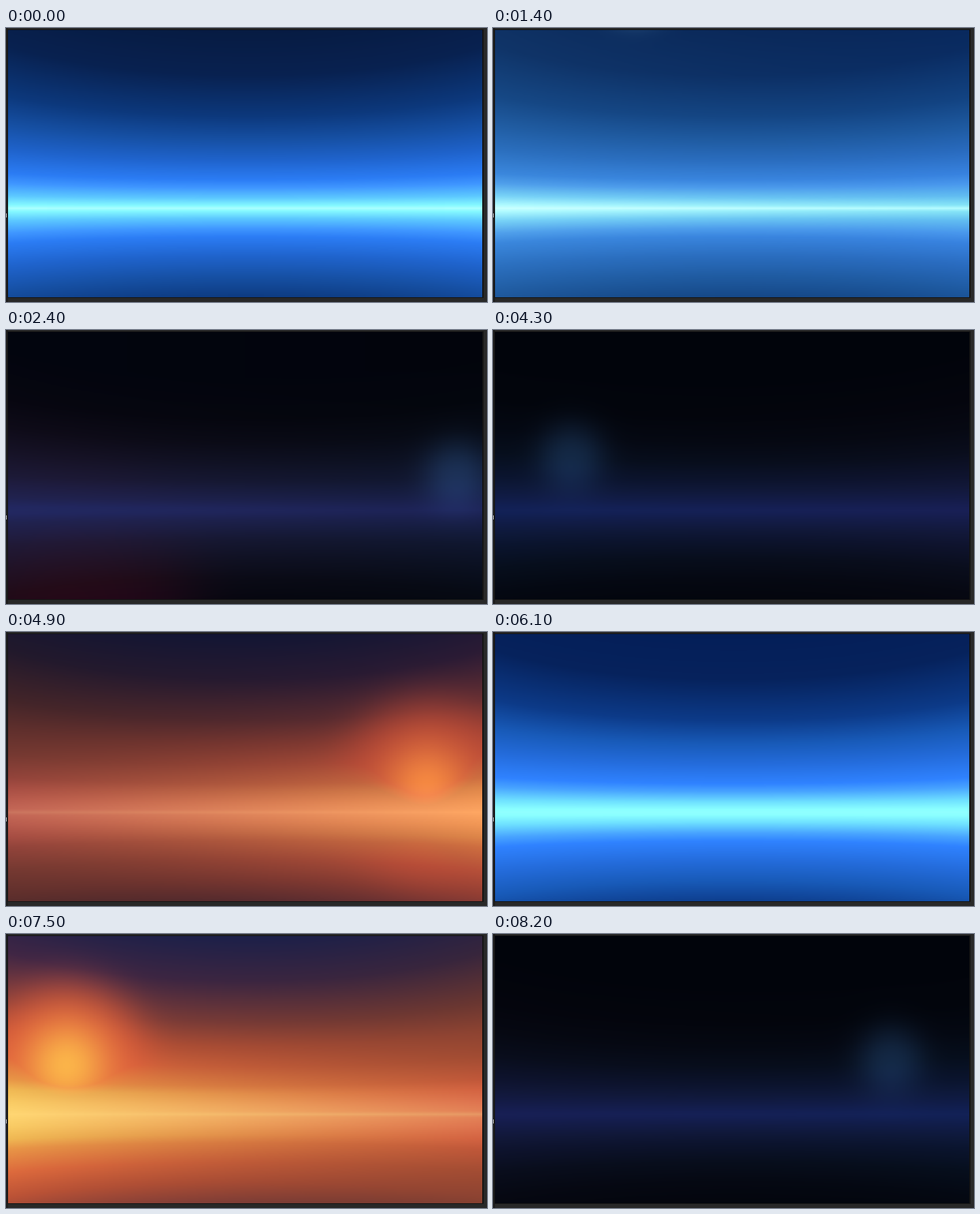
These frames come from a looping animation (707 px wide and 402 px high, 8.3 s). An HTML page with a canvas:

```html
<!DOCTYPE html>
<html lang="en">
<head>
<meta charset="utf-8">
<title>Day and night sky</title>
<style>
html, body { margin: 0; width: 100%; height: 100%; overflow: hidden; background: #282828; }
canvas { display: block; }
</style>
</head>
<body>
<canvas id="stage" width="707" height="402"></canvas>
<script>
const LOOP = 8300, STEP = 100, HOLD_END = 1300;
const DAY = 5532, FIRST_NOON = 707;
const VIEW = { x: 3, y: 3, w: 697, h: 392 };
const CENTER = 353, HORIZON = 264.5, FINE = 4;

const rgb = hex => [0, 2, 4].map(i => parseInt(hex.substr(i, 2), 16));
const palette = text => text.split(' ').map(rgb);
const lerp = (a, b, k) => a + (b - a) * k;
const mix = (a, b, k) => a.map((v, i) => lerp(v, b[i], k));
const clamp = (v, lo, hi) => Math.min(hi, Math.max(lo, v));

// Distance from the horizon of each palette colour.
const STOPS = [0, 4, 15, 30, 42, 70, 100, 135, 195, 262];

// One sky per time away from noon; "near" is the side where the sun stands.
const sky = (at, near, far, sun, core, rim) => ({
  at, near: palette(near), far: palette(far || near), sun, core: rgb(core), rim: rgb(rim)
});
const NIGHT = '12204e 111f4c 0f1b42 0d1734 0a142c 060e1c 040812 02050c 01040b 01040b';
// Sun values: offset from the centre, height on stage, radius.
const SKIES = [
  sky(139, '90ffff 8affff 6ee0ff 48a4ff 2f82ff 246cdc 185ab8 0c3a88 06225c 041e58', '',
    [30, -359, 75], 'b0dee0', '5a94b8'),
  sky(593, 'aaffff 84f8ff 5cc8ff 3f96ff 2b7cf4 1f63cc 1650a4 0c387c 082150 071b42', '',
    [123, -136, 75], 'b0dee0', '5a94b8'),
  sky(861, 'ffffff f8ffff a8e4e8 6cb0c8 5499b4 4084a8 3272a0 266294 1c5490 184c8c',
    'c0f4ff 84c0e8 68a8d8 5898cc 4c8cbc 3a78a8 2a6898 1c548a 0c3c7e 083478',
    [178, -5, 75], 'b0dee0', '5a94b8'),
  sky(1193, 'ffff80 ffff7c fff870 ffe45c ffb84c ff8040 e06438 a04c40 502f52 24295c',
    'ffb468 ff9858 ff8850 fa7440 e86838 c85c34 b45436 8c4638 4a304a 24285a',
    [263, 160, 115], 'ffd850', 'ff6c40'),
  sky(1430, 'ff7050 f8684c e85a44 c84a3c b04038 883234 602630 381a2a 140e22 080a1c',
    'a84c58 9c4654 8c3f4c 703444 5c2c3c 40222f 2a1826 140f1e 080a18 06081a',
    [268, 275, 135], 'f05838', '903030'),
  sky(1693, '222860 222760 20224f 1e1d42 1b1936 151226 0e0b18 070610 02050e 02050e',
    '1c2254 1b2151 171e46 121a38 0f162e 0a1020 060a14 03060d 02040c 02040c',
    [263, 410, 190], '240818', '200818'),
  sky(1950, '181f54 171e52 141b46 111737 0e132e 090d1c 060812 04050d 01040b 01040b',
    '122156 112054 101c47 0d1838 0a142e 060e1c 040812 02050c 01040b 01040b',
    [250, 535, 190], '02040b', '01040b'),
  sky(2250, NIGHT, '', [240, 680, 190], '01040b', '01040b')
];

function skyAt(time) {
  const next = SKIES.findIndex(s => s.at > time);
  if (next === 0) return SKIES[0];
  if (next < 0) return SKIES[SKIES.length - 1];
  const a = SKIES[next - 1], b = SKIES[next];
  const k = (time - a.at) / (b.at - a.at);
  const blend = (p, q) => p.map((c, i) => mix(c, q[i], k));
  return {
    near: blend(a.near, b.near), far: blend(a.far, b.far),
    sun: mix(a.sun, b.sun, k), core: mix(a.core, b.core, k), rim: mix(a.rim, b.rim, k)
  };
}

// Finely sampled colours by distance from the horizon.
function ramp(colors) {
  const out = [];
  for (let i = 0, s = 0; i <= 264 * FINE; i++) {
    const d = i / FINE;
    while (s < STOPS.length - 2 && d > STOPS[s + 1]) s++;
    const k = clamp((d - STOPS[s]) / (STOPS[s + 1] - STOPS[s]), 0, 1);
    out.push(mix(colors[s], colors[s + 1], k));
  }
  return out;
}

function moonAt(phase) {
  const fromMidnight = phase > 0 ? phase - DAY / 2 : phase + DAY / 2;
  const dx = -0.288 * fromMidnight;
  return {
    x: CENTER + dx, y: 147 + 0.00066 * dx * dx,
    light: clamp((1400 - Math.abs(fromMidnight)) / 300, 0, 1)
  };
}
const MOONLIGHT = [13, 27, 42];

const ctx = document.getElementById('stage').getContext('2d');
const buffer = document.createElement('canvas');
buffer.width = 349;
buffer.height = VIEW.h;
const bufferCtx = buffer.getContext('2d');
const image = bufferCtx.createImageData(buffer.width, buffer.height);

function paintSky(phase) {
  const { near, far, sun, core, rim } = skyAt(Math.abs(phase));
  const side = phase > 0 ? -1 : 1;
  const nearRamp = ramp(near), farRamp = ramp(far);
  const sunX = CENTER + side * sun[0], sunY = sun[1], sunR = sun[2];
  const moon = moonAt(phase);
  const scale = VIEW.w / buffer.width;
  let o = 0;
  for (let row = 0; row < buffer.height; row++) {
    const y = VIEW.y + row + 0.5;
    for (let col = 0; col < buffer.width; col++, o += 4) {
      const x = VIEW.x + (col + 0.5) * scale;
      const u = (x - CENTER) / 350;
      const d = Math.abs(y - HORIZON) * (1 - 0.18 * u * u);
      const index = Math.round(d * FINE);
      const a = farRamp[index], b = nearRamp[index];
      const nearness = clamp(0.5 + 0.5 * u * side, 0, 1);
      const s = Math.hypot(x - sunX, y - sunY) / sunR;
      const glow = s < 2 ? Math.exp(-(s ** 4)) : 0;
      const heat = glow ? Math.exp(-3.4 * s * s) : 0;
      const m = Math.hypot(x - moon.x, y - moon.y) / 50;
      const shine = moon.light && m < 2.8 ? moon.light * Math.exp(-(m ** 2.4)) : 0;
      for (let c = 0; c < 3; c++) {
        let v = lerp(a[c], b[c], nearness);
        if (glow) v += glow * Math.max(0, lerp(rim[c], core[c], heat) - v);
        image.data[o + c] = v + shine * MOONLIGHT[c];
      }
      image.data[o + 3] = 255;
    }
  }
  bufferCtx.putImageData(image, 0, 0);
  ctx.drawImage(buffer, VIEW.x, VIEW.y, VIEW.w, VIEW.h);
}

function rect(color, x, y, w, h) {
  ctx.fillStyle = color;
  ctx.fillRect(x, y, w, h);
}

function paintBorder() {
  rect('#282828', 0, 0, 707, 402);
  rect('#1d1d1d', 0, 0, 3, 402);
  rect('#141414', 2, 2, 700, 394);
  rect('#c8c8c8', 0, 272, 1, 6);
}

function render(time) {
  const t = Math.max(time, HOLD_END);
  const phase = (t - FIRST_NOON + DAY / 2) % DAY - DAY / 2;
  paintBorder();
  paintSky(phase);
}

const start = performance.now();
let shown = -1;
function tick() {
  const elapsed = (performance.now() - start) % LOOP;
  const time = Math.max(HOLD_END, Math.floor(elapsed / STEP) * STEP);
  if (time !== shown) render(shown = time);
  requestAnimationFrame(tick);
}
tick();
</script>
</body>
</html>
```
